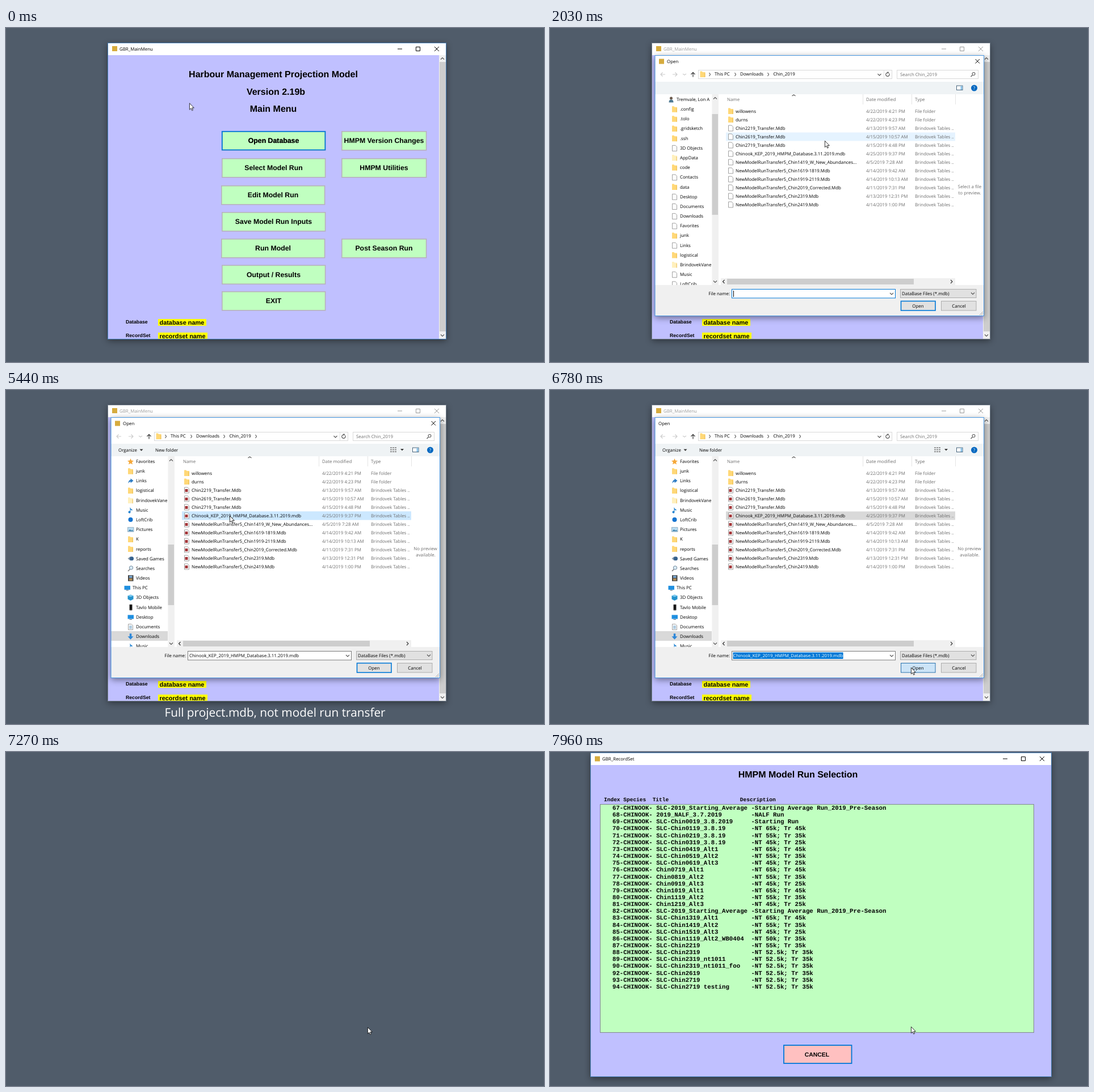
Animation of 948 by 590 pixels, one loop 8000 ms. Source, as an HTML page:

```html
<!DOCTYPE html>
<html lang="en">
<head>
<meta charset="utf-8">
<title>Opening a database</title>
<style>
html, body { margin: 0; width: 100%; height: 100%; overflow: hidden; background: #505c6a; }
svg { display: block; }
text { font: 7.9px "Open Sans", "Noto Sans", sans-serif; white-space: pre; text-rendering: geometricPrecision; }
.mid { text-anchor: middle; }
.end { text-anchor: end; }
.dim { fill: #6d6d6d; }
.bold { font: bold 12.3px "Liberation Sans", Arial, sans-serif; text-anchor: middle; }
.head { font-size: 16px; }
.small { font-size: 8.7px; text-anchor: start; }
.tag { font-size: 10.9px; text-anchor: start; }
.cancel { font-size: 10.4px; }
.mono { font: bold 10.72px "Liberation Mono", monospace; }
.cols { font-size: 9.53px; }
.caption { font-size: 20.8px; fill: #fff; }
.shadow { filter: drop-shadow(0 3px 6px rgba(0,0,0,.45)); }
.line { fill: none; stroke: currentColor; }

/* One loop is 8 s, so 1% is 80 ms. */
.a { animation: 8s step-end infinite; }
.smooth { animation-timing-function: linear; }
.focus { animation-name: focus; }
.edge { animation-name: edge; }
.menu { animation-name: menu; }
.hot { animation-name: hot; }
.dialog { animation-name: dialog; transform-origin: 475px 278px; }
.body { animation-name: body; }
.early { animation-name: early; }
.late { animation-name: late; }
.crumb { animation-name: crumb; }
.hover { animation-name: hover; }
.picked { animation-name: picked; }
.unpicked { animation-name: unpicked; }
.rowfill { animation-name: rowfill; }
.field { animation-name: field; }
.mark { animation-name: mark; }
.name { animation-name: name; }
.caret { animation-name: caret; }
.prompt { animation-name: prompt; }
.nopreview { animation-name: nopreview; }
.ok { animation-name: ok; }
.chrome { animation-name: chrome; }
.bare { animation-name: bare; }
.tip { animation-name: tip; }
.caption { animation-name: caption; }
.records { animation-name: records; transform-origin: 477px 288px; }
.cursor { animation-name: cursor; }

@keyframes focus { 0% { color: #000 } 15.5% { color: #999 } 86% { color: #000 } }
@keyframes edge { 0% { stroke: #4a83bd } 15.5% { stroke: #77828f } 86% { stroke: #4a83bd } }
@keyframes menu { 0%, 88.3% { opacity: 1 } 90.2%, 100% { opacity: 0 } }
@keyframes hot { 0% { opacity: 0 } 5% { opacity: 1 } }
@keyframes dialog {
  0%, 21.6% { opacity: 0; transform: scale(.94) }
  23.5%, 86% { opacity: 1; transform: none }
  87.6%, 100% { opacity: 0; transform: scale(.94) }
}
@keyframes body { 0% { opacity: 0 } 23.5% { opacity: 1 } }
@keyframes early { 0% { opacity: 1 } 26.75% { opacity: 0 } }
@keyframes late { 0% { opacity: 0 } 26.75% { opacity: 1 } }
@keyframes crumb { 0% { opacity: 0 } 31.125% { opacity: 1 } }
@keyframes hover {
  0% { opacity: 1; transform: none }
  34.8% { transform: translateY(15px) }
  39.85% { transform: translateY(30px) }
  69.3% { transform: translateY(45px) }
  70.2% { transform: translateY(60px) }
  70.8% { transform: translateY(75px) }
  71.4% { transform: translateY(90px) }
  71.75% { transform: translateY(105px) }
  72.1% { opacity: 1; transform: translateY(120px) }
  72.4%, 100% { opacity: 0; transform: translateY(120px) }
}
@keyframes picked { 0% { opacity: 0 } 51.5% { opacity: 1 } }
@keyframes unpicked { 0% { opacity: 1 } 51.5% { opacity: 0 } }
@keyframes rowfill { 0% { fill: #cce8ff } 83.875% { fill: #d9d9d9 } }
@keyframes field { 0% { stroke: #0078d7 } 51.5% { stroke: #7a7a7a } }
@keyframes mark { 0% { opacity: 0 } 83.875% { opacity: 1 } }
@keyframes name { 0% { fill: #000 } 83.875% { fill: #fff } }
@keyframes caret { 0% { opacity: 0 } 23.5% { opacity: 1 } 32% { opacity: 0 } 38.6% { opacity: 1 } 45.25% { opacity: 0 } }
@keyframes prompt { 0% { opacity: 1 } 55% { opacity: 0 } }
@keyframes nopreview { 0% { opacity: 0 } 55% { opacity: 1 } }
@keyframes ok {
  0% { fill: #e1e1e1; stroke: #0078d7; stroke-width: 1.6 }
  80.1% { fill: #e5f1fb; stroke: #0078d7; stroke-width: 1 }
  83.875% { fill: #cce4f7; stroke: #2a72ad; stroke-width: 1 }
}
@keyframes chrome { 0% { opacity: 1 } 84.75% { opacity: 0 } }
@keyframes bare { 0% { opacity: 0 } 84.75% { opacity: 1 } }
@keyframes tip { 0% { opacity: 0 } 49.5% { opacity: 1 } 51.5% { opacity: 0 } }
@keyframes caption { 0% { opacity: 0 } 29.25% { opacity: 1 } 83.875% { opacity: 0 } }
@keyframes records {
  0%, 93.6% { opacity: 0; transform: scale(.94) }
  96.6%, 100% { opacity: 1; transform: none }
}
@keyframes cursor {
  0%, 1% { transform: translate(323px, 132.5px); animation-timing-function: ease-in-out }
  7.875%, 34% { transform: translate(484px, 199px); animation-timing-function: ease-in-out }
  43.75%, 65.1% { transform: translate(390px, 222px) }
  66.25%, 68% { transform: translate(394px, 222px); animation-timing-function: ease-in-out }
  77.75%, 78.9% { transform: translate(602px, 470px) }
  80.3% { transform: translate(620px, 491px) }
  81.75%, 86% { transform: translate(636px, 490px) }
  87.5%, 99.4% { transform: translate(637px, 486px) }
  99.5%, 100% { transform: translate(636px, 485px) }
}
</style>
</head>
<body>
<svg id="stage" width="948" height="590" viewBox="0 0 948 590"></svg>
<script>
const text = (x, y, s, cls = '') => `<text x="${x}" y="${y}" class="${cls}" fill="currentColor">${s}</text>`;
const rect = (x, y, w, h, fill, more = '') => `<rect x="${x}" y="${y}" width="${w}" height="${h}" fill="${fill}" ${more}/>`;
const line = (d, color = 'currentColor', w = 1) => `<path d="${d}" fill="none" stroke="${color}" stroke-width="${w}"/>`;
const group = (cls, ...parts) => `<g class="${cls}">${parts.join('')}</g>`;
const chevron = (x, y, dx, dy, color = '#555') =>
  line(dx ? `M${x - dx} ${y - 3}l${2 * dx} 3l${-2 * dx} 3` : `M${x - 3} ${y - dy}l3 ${2 * dy}l3 ${-2 * dy}`, color, 1.1);

const page = '<path d="M1 .5h5.5l2.5 2.5v7.5h-8z" fill="#fff" stroke="#8a8a8a" stroke-width=".8"/>';
const folder = c => `<path d="M.5 0h3.500l1 1.500h4.500v9h-9z" fill="${c}"/><path d="M8 3h1.500v7.500h-1.500z" fill="#e8bb55" opacity=".6"/>`;
const screen = rect(0, 1.5, 10.5, 7, '#1f8fe0') + rect(3, 9, 4.5, 1, '#567');
const icons = {
  page,
  dir: folder('#ffd877'),
  pale: folder('#fff0bd'),
  db: page + rect(2, 3.5, 5, 5, '#a4373a'),
  user: '<circle cx="5" cy="3" r="2.5" fill="#6b5a4c"/><path d="M1 10.500q0-5 4-5t4 5z" fill="#4c7891"/>',
  star: '<path d="M5 0l1.500 3.500 4 .4-3 2.600 1 4-3.500-2-3.500 2 1-4-3-2.600 4-.4z" fill="#f5a83a"/>',
  link: '<path d="M1 10q0-6 4-6.500v-2.500l5 4-5 4v-2.500q-2.500 0-4 3.500z" fill="#2d7cc4"/>',
  note: '<path d="M4 0q1 3 4 4v2q-2-1-3-1.500v4a2 2 0 1 1-1-1.500z" fill="#2583d0"/>',
  dot: '<circle cx="5" cy="5" r="4" fill="#1473d0"/>',
  photo: rect(0, 1.5, 10.5, 7.5, '#b9dcf2', 'stroke="#7b98ac" stroke-width=".7"') + '<path d="M1 8l3-3 2 2 2-1 2 2z" fill="#357ba5"/>',
  game: '<path d="M0 5l5-4v8z" fill="#8397aa"/><circle cx="7" cy="5" r="3.500" fill="#35618d"/>',
  lens: '<path d="M4 6.500l-3.500 3.500" stroke="#777" stroke-width="1.500"/><circle cx="6" cy="4" r="3.200" fill="#d9ecf8" stroke="#72889a"/>',
  film: rect(0.5, 0, 9.5, 10.5, '#444') + rect(2.5, 1, 5.5, 3.7, '#78a6d0') + rect(2.5, 5.7, 5.5, 3.7, '#b48d54'),
  cube: '<path d="M0 2l5-2 5 2v6l-5 2.500-5-2.500z" fill="#2593cd"/><path d="M0 2l5 2 5-2-5-2z" fill="#7dcaf0"/>',
  phone: rect(3, 0, 5, 10.5, '#333', 'rx=".8"') + rect(3.8, 1.5, 3.4, 7, '#111'),
  screen,
  doc: page + line('M2.500 4h5M2.500 6h5M2.500 8h5', '#5590bb', .9),
  down: '<path d="M3.300 0h3.500v5h3.200l-5 5.500-5-5.500h3.300z" fill="#2d87d8"/>'
};
const icon = (kind, x, y) => `<g transform="translate(${x} ${y})">${icons[kind]}</g>`;

const controls = (x, y) =>
  line(`M${x} ${y}h8M${x + 32.5} ${y - 3.5}h7v7h-7zM${x + 65} ${y - 4}l8 8m0-8l-8 8`);
const appIcon = (x, y) => rect(x, y, 9, 9, '#d6ab3e');

/* main menu */
const button = (x, y, label, w = 183) =>
  rect(x + .8, y + .8, w - 1.2, 33, '#c0ffc0', 'stroke="#b7b2bb" stroke-width="1.6"') +
  text(x + w / 2, y + 21.4, label, 'bold');

const menu = group('a smooth menu',
  rect(179.5, 26.5, 596, 523, '#c0c0ff', 'class="shadow"'),
  rect(180, 27, 595, 21, '#fff'),
  group('a focus', text(200, 40, 'GBR_MainMenu'), controls(690, 37)),
  appIcon(187, 32),
  rect(763, 48, 12, 501, '#f0f0f0'), rect(764, 60, 11, 476, '#cdcdcd'),
  chevron(769, 54, 0, -1.5), chevron(769, 543, 0, 1.5),
  text(471, 86.5, 'Harbour Management Projection Model', 'bold head'),
  text(475.5, 117.5, 'Version 2.19b', 'bold head'),
  text(471, 148.3, 'Main Menu', 'bold head'),
  button(380, 182, 'Open Database'),
  rect(380.8, 182.8, 181.6, 32.6, 'none', 'stroke="#0078d7" stroke-width="1.8"'),
  group('a hot', rect(380.5, 182.5, 182, 33, 'none', 'stroke="#0078d7"'), rect(381.5, 183.5, 180, 31, 'none', 'stroke="#dcffe6"')),
  text(471.5, 203.4, 'Open Database', 'bold'),
  button(380, 230, 'Select Model Run'), button(379, 278, 'Edit Model Run'),
  button(380, 325, 'Save Model Run Inputs'), button(379, 372, 'Run Model'),
  button(380, 418.5, 'Output / Results'), button(380, 465, 'EXIT'),
  button(591, 182, 'HMPM Version Changes', 150), button(591, 230, 'HMPM Utilities', 150),
  button(591, 372, 'Post Season Run', 150),
  text(211, 521.5, 'Database', 'bold small'), text(211, 545.5, 'RecordSet', 'bold small'),
  rect(268, 514, 85, 12, '#ff0'), rect(268, 538, 87, 11, '#ff0'),
  text(270.5, 524, 'database name', 'bold tag'),
  '<g clip-path="url(#menuClip)">' + text(270.5, 548.3, 'recordset name', 'bold tag') + '</g>',
  rect(179.5, 26.5, 596, 523, 'none', 'class="a edge"'));

/* file dialog */
const treeRows = list => list.split(',').map((item, i) => {
  const [kind, label] = item.split(':');
  const root = kind === 'user' || label === 'This PC';
  const y = 126 + i * 17.18;
  return icon(kind, root ? 208.5 : 214.5, y - 5) + text(root ? 223 : 229, y + 2.9, label);
}).join('');
const treeBefore = 'user:Tremvale; Lon A,dir:.config,dir:.tolo,dir:.gridsketch,dir:.ssh,page:3D Objects,pale:AppData,' +
  'dir:code,page:Contacts,dir:data,page:Desktop,page:Documents,page:Downloads,page:Favorites,dir:junk,page:Links,' +
  'dir:logistical,pale:BrindovekVane,page:Music,page:LoftCrib';
const treeAfter = 'star:Favorites,dir:junk,link:Links,dir:logistical,pale:BrindovekVane,note:Music,dot:LoftCrib,' +
  'photo:Pictures,dir:K,dir:reports,game:Saved Games,lens:Searches,film:Videos,screen:This PC,cube:3D Objects,' +
  'phone:Tavlo Mobile,screen:Desktop,doc:Documents,down:Downloads,note:Music';

const chosen = 'Chinook_KEP_2019_HMPM_Database.3.11.2019.mdb';
const run = 'NewModelRunTransfer5_Chin';
const files = [
  ['willowens', '22/2019 4:21 PM'], ['durns', '22/2019 4:23 PM'],
  ['Chin2219_Transfer.Mdb', '13/2019 9:57 AM'], ['Chin2619_Transfer.Mdb', '15/2019 10:57 AM'],
  ['Chin2719_Transfer.Mdb', '15/2019 4:48 PM'], [chosen, '25/2019 9:37 PM'],
  [run + '1419_W_New_Abundances...', '5/2019 7:28 AM'], [run + '1619-1819.Mdb', '14/2019 9:42 AM'],
  [run + '1919-2119.Mdb', '14/2019 10:13 AM'], [run + '2019_Corrected.Mdb', '11/2019 7:31 PM'],
  [run + '2319.Mdb', '13/2019 12:31 PM'], [run + '2419.Mdb', '14/2019 1:00 PM']
];
const fileRows = files.map(([name, date], i) => {
  const y = 147 + i * 15, dir = i < 2;
  return (dir ? icon('dir', 313.5, y - 5.5)
    : group('a early', icon('page', 313.5, y - 5.5)) + group('a late', icon('db', 313.5, y - 5.5))) +
    text(327, y + 2.9, name) +
    group('dim', `<text x="557" y="${y + 2.9}">4/${date}</text><text x="643" y="${y + 2.9}">${dir ? 'File folder' : 'Brindovek Tables ..'}</text>`);
}).join('');

const dim = (x, y, s, cls = '') => `<text x="${x}" y="${y}" class="${cls}" fill="#6d6d6d">${s}</text>`;
const dialog = group('a smooth dialog',
  rect(185, 48.5, 580, 460.5, '#fff', 'class="shadow"'),
  rect(185, 95, 580, 22, '#eff3f5'), rect(185, 454, 580, 55, '#f0f0f0'),
  group('a chrome', appIcon(192, 54.5), text(206, 62, 'Open'), line('M749.500 55l7.500 7.500m0-7.500l-7.500 7.500')),
  group('a bare', text(191, 62, 'Open')),
  line('M203 82h-8m3.500-3.500l-3.500 3.500 3.500 3.500M216 82h8m-3.500-3.500l3.500 3.500-3.500 3.500', '#ccc', 1.2),
  chevron(237, 82, 0, 1, '#ccc'),
  line('M252 86.500v-8m-3.500 3.500l3.500-3.500 3.500 3.500', '#444', 1.3),
  rect(261.5, 74.5, 341, 15, '#fff', 'stroke="#d9d9d9"'), line('M588.500 75v14', '#e0e0e0'),
  icon('dir', 264, 76.5),
  chevron(281.5, 82, 1, 0), text(290, 84.4, 'This PC'), chevron(326.5, 82, 1, 0),
  text(335, 84.4, 'Downloads'), chevron(384.5, 82, 1, 0), text(393.5, 84.4, 'Chin_2019'),
  group('a crumb', chevron(440.5, 82, 1, 0)),
  chevron(580.5, 82.5, 0, 1.5),
  line('M597.500 80.300a3.200 3.200 0 1 1-3-1.300h2.500m-1.500-2v3', '#444', 1.1),
  rect(611.5, 74.5, 143, 15, '#fff', 'stroke="#d9d9d9"'), dim(617, 84.8, 'Search Chin_2019'),
  line('M741.500 86l3-3m-.5-1.500a2.500 2.500 0 1 1 2.500 2a2.500 2.500 0 0 1-2.500-2', '#555', 1.1),
  group('a late',
    text(198, 108.5, 'Organize'), '<path d="M235.500 104.500h6l-3 3.300z" fill="#333"/>', text(263, 108.5, 'New folder'),
    line('M677 102h3m1 0h3m1 0h3M677 105.500h3m1 0h3m1 0h3M677 109h3m1 0h3m1 0h3', '#777', 1.4),
    '<path d="M695 104h6l-3 3.300z" fill="#333"/>'),
  rect(716.5, 102, 10.5, 7.5, '#fff', 'stroke="#47657d"'), rect(723.5, 102.5, 3, 6.5, '#8cc4ea'),
  '<circle cx="747.500" cy="106" r="5.500" fill="#0067c0"/><text x="747.5" y="109" class="mid" fill="#fff" font-weight="bold">?</text>',
  group('a body',
    '<g clip-path="url(#treeClip)">',
    group('a early', treeRows(treeBefore).replace(';', ',')),
    group('a late', rect(185, 426, 100, 17, '#d9d9d9'), treeRows(treeAfter)),
    '</g>',
    rect(285.5, 117, 11.5, 337, '#f0f0f0'),
    group('a early', rect(285.5, 152, 10.5, 178, '#cdcdcd')), group('a late', rect(285.5, 273, 10.5, 107, '#cdcdcd')),
    chevron(291, 124, 0, -1.5), chevron(291, 448, 0, 1.5),
    line('M551.500 117v18M637.500 117v18M714.500 117v18', '#e5e5e5'),
    chevron(429.5, 119, 0, -1),
    group('', dim(312, 129.3, 'Name'), dim(557, 129.3, 'Date modified'), dim(643, 129.3, 'Type')),
    rect(310, 184.5, 404, 15, '#e5f3ff', 'class="a hover"'),
    group('a picked', rect(310, 214.5, 404, 15, '#cce8ff', 'class="a rowfill"')),
    '<g clip-path="url(#listClip)">' + fileRows + '</g>',
    rect(301, 442, 413, 12, '#f0f0f0'), rect(312, 443, 329, 10, '#cdcdcd'),
    line('M307.500 445l-3 3 3 3', '#333', 1.2), chevron(707.5, 448, 1.5, 0, '#333'),
    group('a prompt', dim(739.5, 283, 'Select a file', 'mid'), dim(739.5, 294, 'to preview.', 'mid')),
    group('a nopreview', dim(739, 283, 'No preview', 'mid'), dim(739.5, 294, 'available.', 'mid'))),
  text(317, 472, 'File name:', 'end'),
  rect(320.5, 461.5, 288, 15.5, '#fff', 'class="a field"'),
  chevron(602, 469.5, 0, 1.5),
  line('M323.500 464v11', '#000').replace('<path', '<path class="a caret"'),
  group('a picked',
    '<rect id="mark" class="a mark" x="322.5" y="463.5" width="197" height="11.5" fill="#0078d7"/>',
    `<text id="name" class="a name" x="323" y="472.200">${chosen}</text>`),
  rect(617.5, 461.5, 133.5, 15, '#e1e1e1', 'stroke="#adadad"'),
  text(620, 472, 'DataBase Files (*.mdb)'), chevron(745, 469, 0, 1.5),
  rect(618.5, 482.5, 60.5, 16.5, '#e1e1e1', 'class="a ok"'), text(648.5, 493.5, 'Open', 'mid'),
  rect(689.5, 482.5, 61.5, 16.5, '#e1e1e1', 'stroke="#adadad"'), text(720.5, 493.5, 'Cancel', 'mid'),
  line('M757 507l6-6M760 507l3-3', '#aaa', 1),
  rect(185, 48.5, 579.5, 460, 'none', 'stroke="#4795e0"'),
  group('a tip',
    rect(391.5, 231.5, 136.5, 34.5, '#fff', 'stroke="#767676" style="filter:drop-shadow(2px 2px 1px #0006)"'),
    ...['Type: Brindovek Tables Database', 'Size: 426 MB', 'Date modified: 4/25/2019 9:37 PM']
      .map((s, i) => dim(396, 241.2 + i * 10.5, s))));

/* record list */
const loads = ['NT 65k; Tr 45k', 'NT 55k; Tr 35k', 'NT 45k; Tr 25k'];
const two = n => String(n).padStart(2, '0');
const starting = ['SLC-2019_Starting_Average', 'Starting Average Run_2019_Pre-Season'];
const alts = (first, count, prefix, suffix) => Array.from({ length: count }, (_, i) =>
  [`${prefix}Chin${two(first + i)}19_${suffix || 'Alt' + (i % 3 + 1)}`, loads[i % 3]]);
const records = [
  starting, ['2019_NALF_3.7.2019', 'NALF Run'], ['SLC-Chin0019_3.8.2019', 'Starting Run'],
  ...alts(1, 3, 'SLC-', '3.8.19'), ...alts(4, 3, 'SLC-'), ...alts(7, 6, ''),
  starting, ...alts(13, 3, 'SLC-'),
  ['SLC-Chin1119_Alt2_WB0404', 'NT 50k; Tr 35k'], ['SLC-Chin2219', loads[1]],
  ...['2319', '2319_nt1011', '2319_nt1011_foo', '2619', '2719', '2719 testing']
    .map(s => ['SLC-Chin' + s, 'NT 52.5k; Tr 35k'])
];
const recordRows = records.map(([title, note], i) =>
  text(110, 102 + i * 12.15, `${67 + i + (i > 23)}-CHINOOK- ${title.padEnd(26)}-${note}`, 'mono')).join('');

const recordWindow = group('a smooth records',
  rect(71.5, 1.5, 812, 572, '#c0c0ff', 'class="shadow"'),
  rect(72, 2, 811, 21, '#fff'),
  appIcon(79, 7.5), text(92, 15, 'GBR_RecordSet'), controls(798, 12),
  text(437, 44.5, 'HMPM Model Run Selection', 'bold head'),
  text(95, 87, 'Index Species  Title'.padEnd(42) + 'Description', 'mono cols'),
  rect(88.5, 92.5, 764, 403, '#c0ffc0', 'stroke="#828790"'),
  recordRows,
  rect(412, 518, 119.5, 32, '#ffc0c0', 'stroke="#0078d7" stroke-width="1.8"'),
  text(470.5, 538, 'CANCEL', 'bold cancel'),
  rect(71.5, 1.5, 812, 572, 'none', 'stroke="#4a83bd"'));

const clip = (id, x, y, w, h) => `<clipPath id="${id}">${rect(x, y, w, h, '#000')}</clipPath>`;
document.getElementById('stage').innerHTML =
  '<defs>' + clip('menuClip', 180, 48, 583, 501) + clip('treeClip', 185, 117, 99.5, 337) + clip('listClip', 300, 117, 414, 325) + '</defs>' +
  menu + dialog +
  '<text x="474" y="577" class="a caption mid">Full project.mdb, not model run transfer</text>' +
  recordWindow +
  '<path class="a smooth cursor" d="M.4 .4v11.300l2.600-2.400 1.700 3.900 1.800-.8-1.700-3.800h3.500z" fill="#fff" stroke="#000" stroke-width=".8"/>';

document.getElementById('mark').setAttribute('width', document.getElementById('name').getComputedTextLength() + 1);
</script>
</body>
</html>
```
